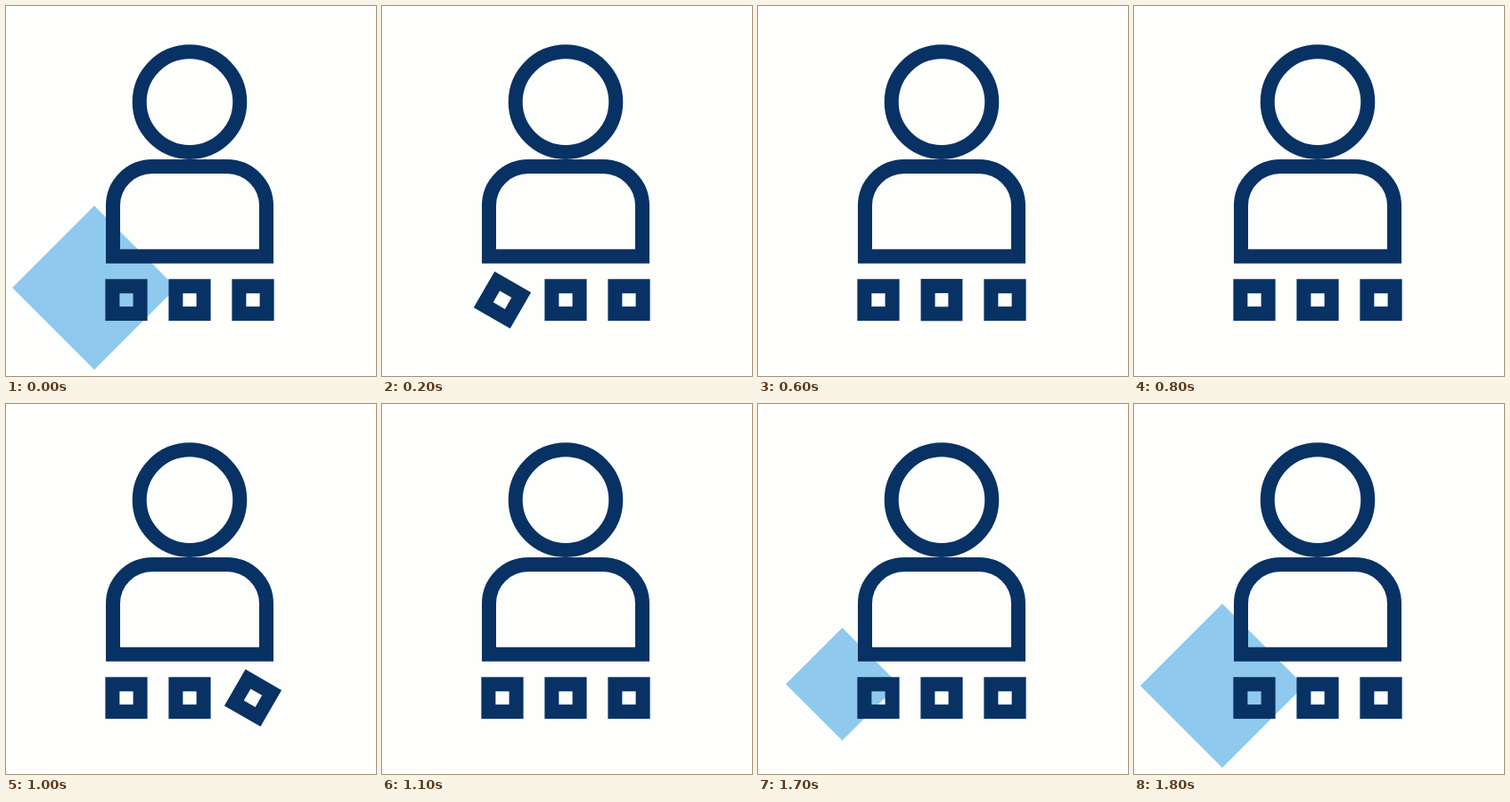
Recreate the animation shown at these times as an HTML page. Size 415 by 415 pixels, loop 1.9 s.

```html
<!DOCTYPE html>
<html lang="en">
<head>
<meta charset="utf-8">
<title>Person with spinning squares</title>
<style>
  html, body { margin: 0; width: 100%; height: 100%; overflow: hidden; background: #fefefd; }
  svg { display: block; width: 100vw; height: 100vh; }
  .line { fill: none; stroke: #083264; stroke-width: 16; }
</style>
</head>
<body>
<svg viewBox="0 0 415 415">
  <path id="diamond" d="M0-92 92 0 0 92-92 0Z" fill="#8fcaee"/>
  <g class="line">
    <circle cx="206" cy="107.6" r="56.3"/>
    <path d="M120 280.7V224A44 44 0 0 1 164 180H248A44 44 0 0 1 292 224V280.7Z"/>
    <rect class="box" x="-15.6" y="-15.4" width="31.2" height="30.8"/>
    <rect class="box" x="-15.6" y="-15.4" width="31.2" height="30.8"/>
    <rect class="box" x="-15.6" y="-15.4" width="31.2" height="30.8"/>
  </g>
</svg>
<script>
const LOOP = 1900, STEP = 100, SPIN = 300;
const diamond = document.getElementById('diamond');
const boxes = [...document.querySelectorAll('.box')];
const spins = [{ x: 135, start: 150 }, { x: 206, start: 450 }, { x: 277, start: 800 }];

const clamp = v => Math.max(0, Math.min(1, v));
const mix = (a, b, p) => a + (b - a) * p;

function draw(t) {
  // The diamond grows in at the end of the loop and stays into the next one.
  const hidden = t >= 200 && t < 1600;
  const p = t < 200 ? 1 : clamp((t - 1600) / 200);
  diamond.style.display = hidden ? 'none' : '';
  diamond.setAttribute('transform',
    `translate(${mix(90, 99, p)} ${mix(312.6, 316, p)}) scale(${mix(0.376, 1, p)})`);

  boxes.forEach((box, i) => {
    const { x, start } = spins[i];
    const angle = 180 * clamp((t - start) / SPIN);
    box.setAttribute('transform', `translate(${x} 329.7) rotate(${angle})`);
  });
}

const origin = performance.now();
function tick() {
  const t = (performance.now() - origin) % LOOP;
  draw(Math.floor(t / STEP) * STEP);
  requestAnimationFrame(tick);
}
tick();
</script>
</body>
</html>
```
